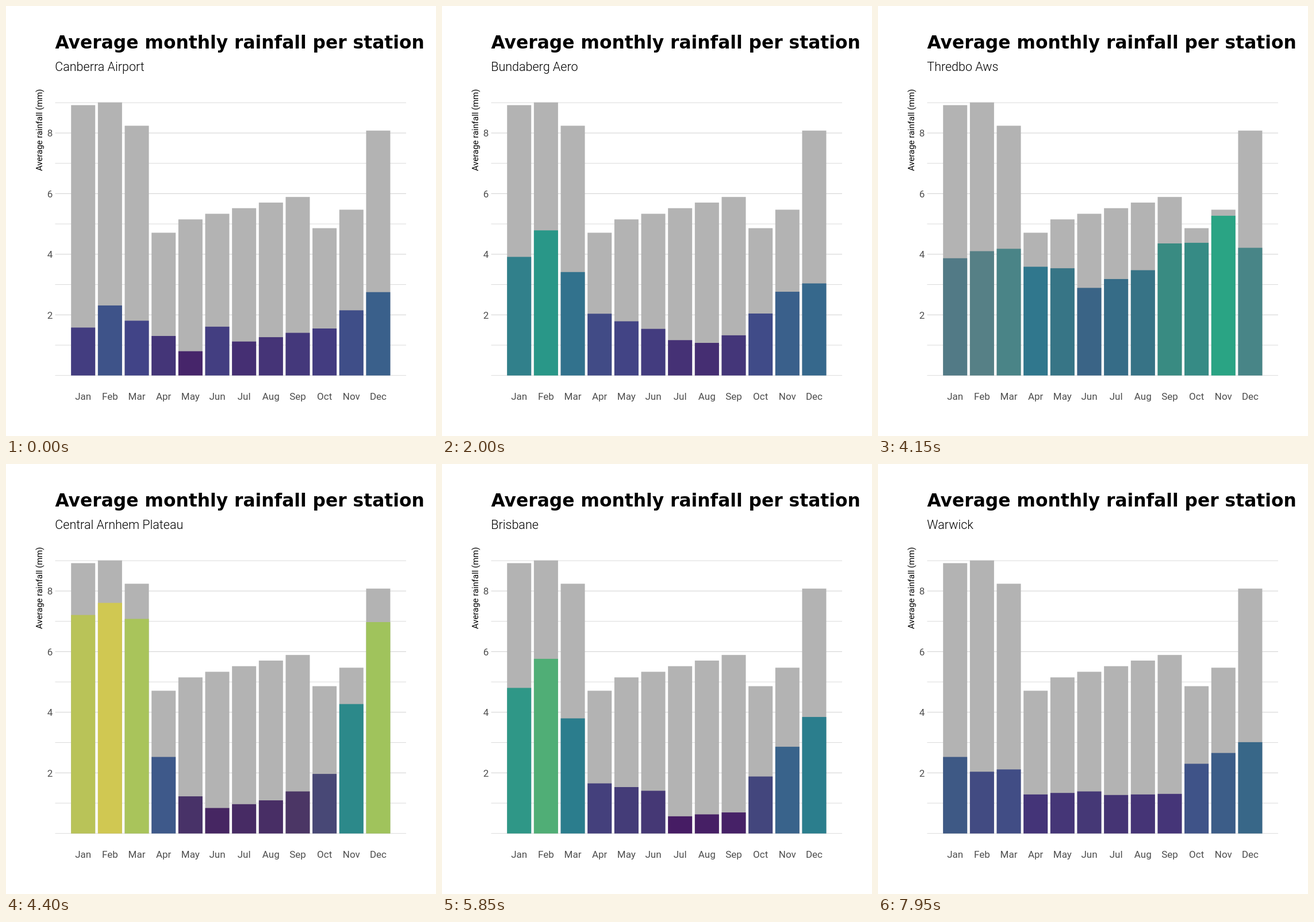
Recreate the animation shown at these times as an HTML page. Size 748 by 748 pixels, loop 8 s.

```html
<!DOCTYPE html>
<html lang="en">
<head>
<meta charset="utf-8">
<title>Average monthly rainfall per station</title>
<style>
  html, body { margin: 0; width: 100%; height: 100%; overflow: hidden; background: #fff; }
  svg { display: block; width: 100%; height: 100%; font-family: Roboto, "Open Sans", sans-serif; }
  .title { font: bold 31.3px "DejaVu Sans", sans-serif; }
  .station { font-size: 21.5px; font-weight: 300; }
  .axis { font-size: 14.9px; }
  .tick { font-size: 17px; fill: #4d4d4d; }
</style>
</head>
<body>
<svg viewBox="0 0 748 748"></svg>
<script>
const LOOP = 8000, PERIOD = 750, HOLD = 400, STEP = 50, STEPS = 8;
const BASE = 642.7, UNIT = 52.72, FIRST = 134.2, PITCH = 46.66, BAR = 42, MAX = 9.01;
const months = 'Jan Feb Mar Apr May Jun Jul Aug Sep Oct Nov Dec'.split(' ');
const viridis = ['#440154', '#414487', '#2a788e', '#22a884', '#7ad151', '#fde725'];

// Turning points of each year; the months between them lie on straight lines.
const highest = yearly({ Jan: 8.92, Feb: MAX, Mar: 8.24, Apr: 4.71, May: 5.15, Sep: 5.89, Oct: 4.86, Nov: 5.47, Dec: 8.08 });
const stations = [
  ['Canberra Airport', { Jan: 1.58, Feb: 2.31, May: .8, Jun: 1.61, Jul: 1.12, Oct: 1.55, Dec: 2.75 }],
  ['Casino Airport Aws', { Jan: 4.2, Feb: 5.2, Mar: 4.7, Apr: 2.6, Jun: 2.75, Jul: 1.1, Sep: 1.35, Nov: 3.7 }],
  ['Bundaberg Aero', { Feb: 5.2, Apr: 2.3, Jul: 1.1, Sep: 1.2 }],
  ['Richmond Raaf', { Feb: 4.1, Apr: 1.6, Jun: 1.6, Aug: .95, Nov: 2.7, Dec: 2.1 }],
  ['Sydney (Observatory Hill)', { Feb: 4, Apr: 4.5, May: 3.65, Jun: 4.8, Jul: 2.9, Sep: 2.26, Dec: 2.6 }],
  ['Thredbo Aws', { Jan: 3.2, May: 4, Jun: 3.3, Aug: 3.95, Sep: 4.95, Oct: 4.86, Nov: 5.47, Dec: 3.66 }],
  ['Central Arnhem Plateau', { Feb: MAX, Mar: 8.24, Apr: 2.1, May: .3, Jun: .02, Sep: .2, Oct: 1, Nov: 3.87, Dec: 8.08 }],
  ['Georgetown Airport', { Feb: 7.2, Mar: 4.16, Apr: .64, Jun: .09, Sep: .1, Oct: .68, Dec: 4 }],
  ['Brisbane', { Feb: 4.9, Apr: 2.26, Jun: 2.2, Jul: .85, Sep: 1.05, Oct: 2.6 }],
  ['Orange Airport', { Jan: 2.8, Apr: 1.6, Aug: 2.5 }],
  ['Warwick', { Feb: 2.45, Mar: 2.4, Apr: 1.15, Jul: .9, Sep: 1.1, Oct: 2.5, Dec: 3.6 }],
  ['Mount Gambier Aero', { Feb: .8, Jun: 2.6 }]
].map(([name, points]) => ({ name, rain: yearly(points) }));

function yearly(points) {
  const at = i => points[months[(i + 12) % 12]];
  return months.map((_, i) => {
    let before = 0, after = 0;
    while (at(i - before) === undefined) before++;
    while (at(i + after) === undefined) after++;
    return lerp(at(i - before), at(i + after), before / (before + after || 1));
  });
}

function lerp(a, b, p) {
  return a + (b - a) * p;
}

function mix(a, b, p) {
  return `color-mix(in lab, ${b} ${p * 100}%, ${a})`;
}

function shade(value) {
  const pos = value / MAX * 5, i = Math.min(Math.floor(pos), 4);
  return mix(viridis[i], viridis[i + 1], pos - i);
}

const svg = document.querySelector('svg');

function add(tag, attrs, text = '') {
  const el = document.createElementNS('http://www.w3.org/2000/svg', tag);
  for (const name in attrs) el.setAttribute(name, attrs[name]);
  el.textContent = text;
  return svg.appendChild(el);
}

function setHeight(bar, value) {
  bar.setAttribute('y', BASE - value * UNIT);
  bar.setAttribute('height', value * UNIT);
}

function addBar(i, value, fill) {
  const bar = add('rect', { x: FIRST + i * PITCH - BAR / 2, width: BAR, fill });
  setHeight(bar, value);
  return bar;
}

for (let v = 0; v < 10; v++) {
  const y = BASE - v * UNIT, major = v && v % 2 === 0;
  add('path', { d: `M85.5 ${y}H696`, stroke: '#ccc', 'stroke-width': major ? .9 : .7 });
  if (major) add('text', { x: 81.3, y: y + 6.4, class: 'tick', 'text-anchor': 'end' }, v);
}
highest.forEach((value, i) => addBar(i, value, '#b3b3b3'));
const bars = months.map((name, i) => {
  add('text', { x: FIRST + i * PITCH, y: 684.6, class: 'tick', 'text-anchor': 'middle' }, name);
  return addBar(i, 0, viridis[0]);
});
add('text', { x: 85.5, y: 74, class: 'title' }, 'Average monthly rainfall per station');
add('text', { transform: 'translate(63 287) rotate(-90)', class: 'axis' }, 'Average rainfall (mm)');
const label = add('text', { x: 85.3, y: 112.5, class: 'station' });

function draw(time) {
  const t = time % LOOP, k = Math.floor(t / PERIOD), rest = t - k * PERIOD;
  const p = rest < HOLD ? 0 : (Math.floor((rest - HOLD) / STEP) + 1) / STEPS;
  const from = stations[k], to = stations[k + 1];
  label.textContent = (p > .5 ? to : from).name;
  bars.forEach((bar, i) => {
    const a = from.rain[i], b = to.rain[i];
    setHeight(bar, lerp(a, b, p));
    bar.style.fill = mix(shade(a), shade(b), p);
  });
}

const start = performance.now();
function tick() {
  draw(performance.now() - start);
  requestAnimationFrame(tick);
}
tick();
</script>
</body>
</html>
```
